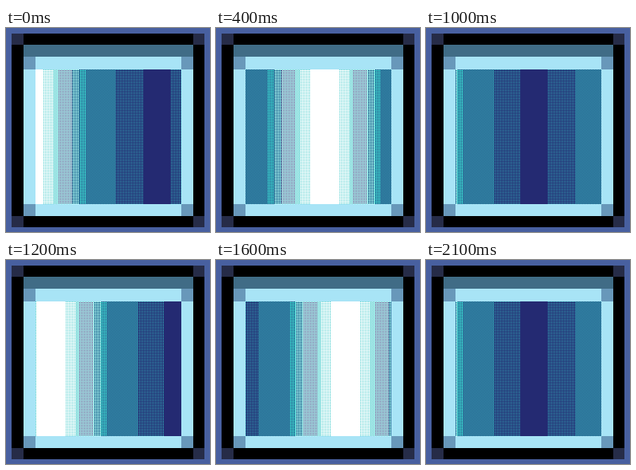
Write an HTML page with a canvas that moves like this. It is 256 px wide and 256 px high and loops after 2.2 s.

```html
<!DOCTYPE html>
<html>
<head>
<meta charset="utf-8">
<style>
html, body { margin: 0; width: 100%; height: 100%; overflow: hidden; background: #4860a0; }
canvas { display: block; width: 256px; height: 256px; image-rendering: pixelated; }
</style>
</head>
<body>
<canvas id="stage" width="256" height="256"></canvas>
<script>
const ctx = document.getElementById('stage').getContext('2d');
const rect = (color, x0, y0, x1, y1) => {
  ctx.fillStyle = color;
  ctx.fillRect(x0, y0, x1 - x0, y1 - y0);
};

function drawFrame() {
  rect('#4860a0', 0, 0, 256, 256);
  rect('#000', 7, 7, 249, 250);
  rect('#406c86', 22, 21, 235, 36);
  rect('#a8e4f6', 22, 36, 235, 236);
  for (const x of [7, 235]) {
    const right = x === 7 ? 22 : 249;
    rect('#262c48', x, 7, right, 21);
    rect('#262c48', x, 236, right, 250);
  }
  for (const x of [22, 220]) {
    rect('#6898ba', x, 36, x + 15, 52);
    rect('#6898ba', x, 221, x + 15, 236);
  }
}

// Outer distance from the white centre, and the 2x2 weave of that band.
const bands = [
  [18, 'WWWW'], [31, 'CWWW'], [36, 'CWWC'], [54, 'CWWN'], [63, 'CWNC'],
  [71, 'CNCC'], [109, 'CNNC'], [143, 'CNNN'], [161, 'NNNN']
];
const ink = { W: [255, 255, 255], C: [56, 200, 200], N: [36, 42, 114] };
const box = { x: 37, y: 52, w: 183, h: 169 };
const period = 320;
const step = period / 12;
const image = ctx.createImageData(box.w, box.h);

function drawBands(pose) {
  const center = 136 + (pose - 4) * step;
  for (let x = 0; x < box.w; x++) {
    const offset = (box.x + x + 0.5 - center + 2 * period) % period;
    const distance = Math.min(offset, period - offset);
    const weave = bands.find(([end]) => distance < end)[1];
    for (let y = 0; y < box.h; y++) {
      const color = ink[weave[(y % 2) * 2 + x % 2]];
      image.data.set([...color, 255], (y * box.w + x) * 4);
    }
  }
  ctx.putImageData(image, box.x, box.y);
}

// Eleven poses of a twelve-step sweep, so the wrap skips one step.
let shown = -1;
function tick() {
  const pose = Math.floor(performance.now() / 100) % 11;
  if (pose !== shown) drawBands(shown = pose);
  requestAnimationFrame(tick);
}

drawFrame();
tick();
</script>
</body>
</html>
```
